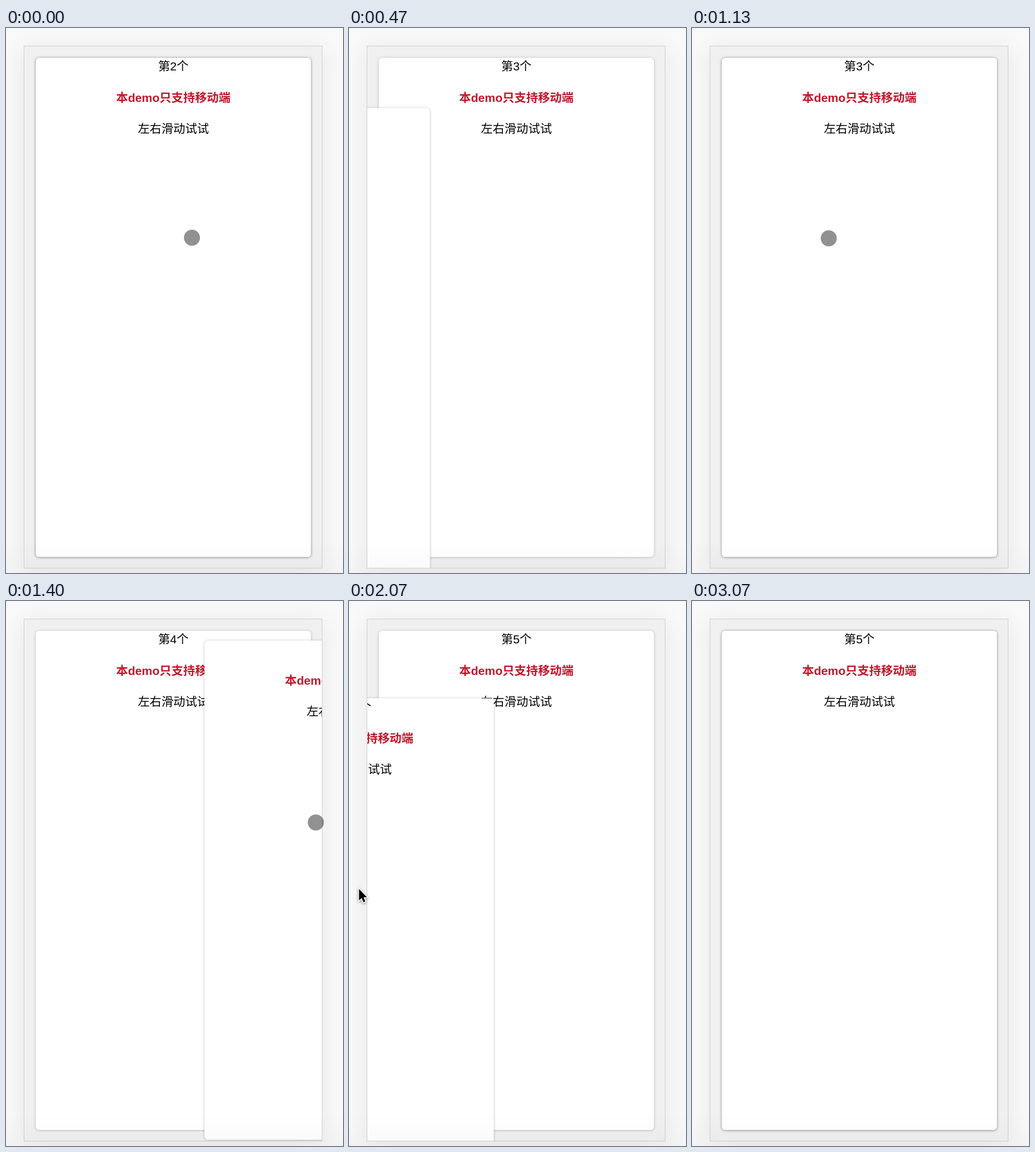
Write an HTML page with a canvas that moves like this. It is 589 px wide and 951 px high and loops after 3740 ms.

```html
<!DOCTYPE html>
<html lang="zh-CN">
<head>
<meta charset="utf-8">
<title>Card stack</title>
<style>
html, body { margin: 0; width: 100%; height: 100%; overflow: hidden; background: #fafafa; }
canvas { display: block; }
</style>
</head>
<body>
<canvas id="stage" width="589" height="951"></canvas>
<script>
const W = 589, H = 951, LOOP = 3740, TICK = 1000 / 15;
const ctx = document.getElementById('stage').getContext('2d');
const FONT = '20.7px "Liberation Sans", "Noto Sans CJK SC", "Noto Sans CJK", sans-serif';
const FLY = 521, DECAY = 0.537;

// d1, d2: distance on the first two ticks of a drag; then the card eases out
const swipes = [
  { start: 4, end: 12, dir: -1, d1: 76, y1: 1, d2: 280, slope: 0.275 },
  { start: 19, end: 26, dir: 1, d1: 45, y1: 2.6, d2: 295, slope: 0.0576 },
  { start: 29, end: 36, dir: -1, d1: 57, y1: 24, d2: 280, slope: 0.42 }
];

// tick, then x, y and shape; a bare tick hides the pointer
const pointer = [
  [0, 325, 366, dot], [1, 338, 372, dot], [2, 342, 377, dot], [4, 300, 377, dot],
  [5, 168.5, 381, arrow], [6, 9.5, 440, arrow], [7],
  [13, 70, 450, dot], [14, 150, 405, dot], [15, 205, 378, dot], [16, 232, 369, dot],
  [17, 239, 367, dot], [19, 262, 368, dot], [20, 400, 374, dot], [21, 541.5, 386.5, dot], [22],
  [27, 440, 420, dot], [28, 330, 392, dot], [29, 300, 384, dot], [30, 190, 420, dot],
  [31, 17.5, 502.5, arrow], [35]
];

function dot(x, y) {
  ctx.fillStyle = 'rgba(0,0,0,.43)';
  ctx.beginPath();
  ctx.arc(x, y, 14, 0, Math.PI * 2);
  ctx.fill();
}

function arrow(x, y) {
  const shape = [[0, 0], [0, 20], [4.6, 15.7], [7.8, 23.2], [11, 21.8], [7.9, 14.5], [14, 14.5]];
  ctx.save();
  ctx.translate(x, y);
  ctx.beginPath();
  shape.forEach(p => ctx.lineTo(...p));
  ctx.closePath();
  ctx.lineWidth = 3;
  ctx.strokeStyle = '#fff';
  shadow('rgba(0,0,0,.4)', 4, 1.5);
  ctx.stroke();
  shadow('transparent', 0, 0);
  ctx.fillStyle = '#000';
  ctx.fill();
  ctx.restore();
}

function shadow(color, blur, dy) {
  ctx.shadowColor = color;
  ctx.shadowBlur = blur;
  ctx.shadowOffsetY = dy;
}

function line(text, y, color = '#000', weight = '') {
  ctx.font = weight + ' ' + FONT;
  ctx.fillStyle = color;
  ctx.fillText(text, 292.5, y);
}

function card(number, dx, dy) {
  ctx.save();
  ctx.translate(dx, dy);
  shadow('rgba(0,0,0,.25)', 4, 0.5);
  ctx.fillStyle = '#fff';
  ctx.beginPath();
  ctx.roundRect(52, 52, 481, 871, 6);
  ctx.fill();
  shadow('transparent', 0, 0);
  ctx.textAlign = 'center';
  line('第' + number + '个', 74);
  line('本demo只支持移动端', 129, '#c0172b', 'bold');
  line('左右滑动试试', 183);
  ctx.restore();
}

function offset(s, n) {
  const k = n - s.start;
  if (k < 1) return [0, 0];
  const d = k === 1 ? s.d1 : FLY - (FLY - s.d2) * DECAY ** (k - 2);
  return [s.dir * d, s.y1 + (d - s.d1) * s.slope];
}

function page() {
  ctx.fillStyle = '#fafafa';
  ctx.fillRect(0, 0, W, H);
  ctx.save();
  shadow('rgba(0,0,0,.08)', 40, 5);
  ctx.fillStyle = '#f0f0f0';
  ctx.fillRect(31, 31, 522, 912);
  ctx.restore();
}

function draw(n) {
  page();
  ctx.save();
  ctx.beginPath();
  ctx.rect(32, 32, 520, 910);
  ctx.clip();
  const gone = swipes.filter(s => n >= s.end).length;
  const move = gone < swipes.length ? offset(swipes[gone], n) : [0, 0];
  card(gone + 3, 0, 0);
  card(gone + 2, ...move);
  ctx.restore();

  ctx.strokeStyle = '#d0d0d0';
  ctx.lineWidth = 1;
  ctx.strokeRect(31.5, 31.5, 521, 911);

  const fade = ctx.createLinearGradient(0, 895, 0, H);
  fade.addColorStop(0, 'rgba(0,0,0,0)');
  fade.addColorStop(1, 'rgba(0,0,0,.025)');
  ctx.fillStyle = fade;
  ctx.fillRect(0, 895, W, H - 895);

  const [, x, y, shape] = pointer.filter(p => p[0] <= n).pop();
  if (shape) shape(x, y);
}

const began = performance.now();
function loop() {
  const t = (performance.now() - began) % LOOP;
  draw(Math.floor((t + 4) / TICK));
  requestAnimationFrame(loop);
}
loop();
</script>
</body>
</html>
```
